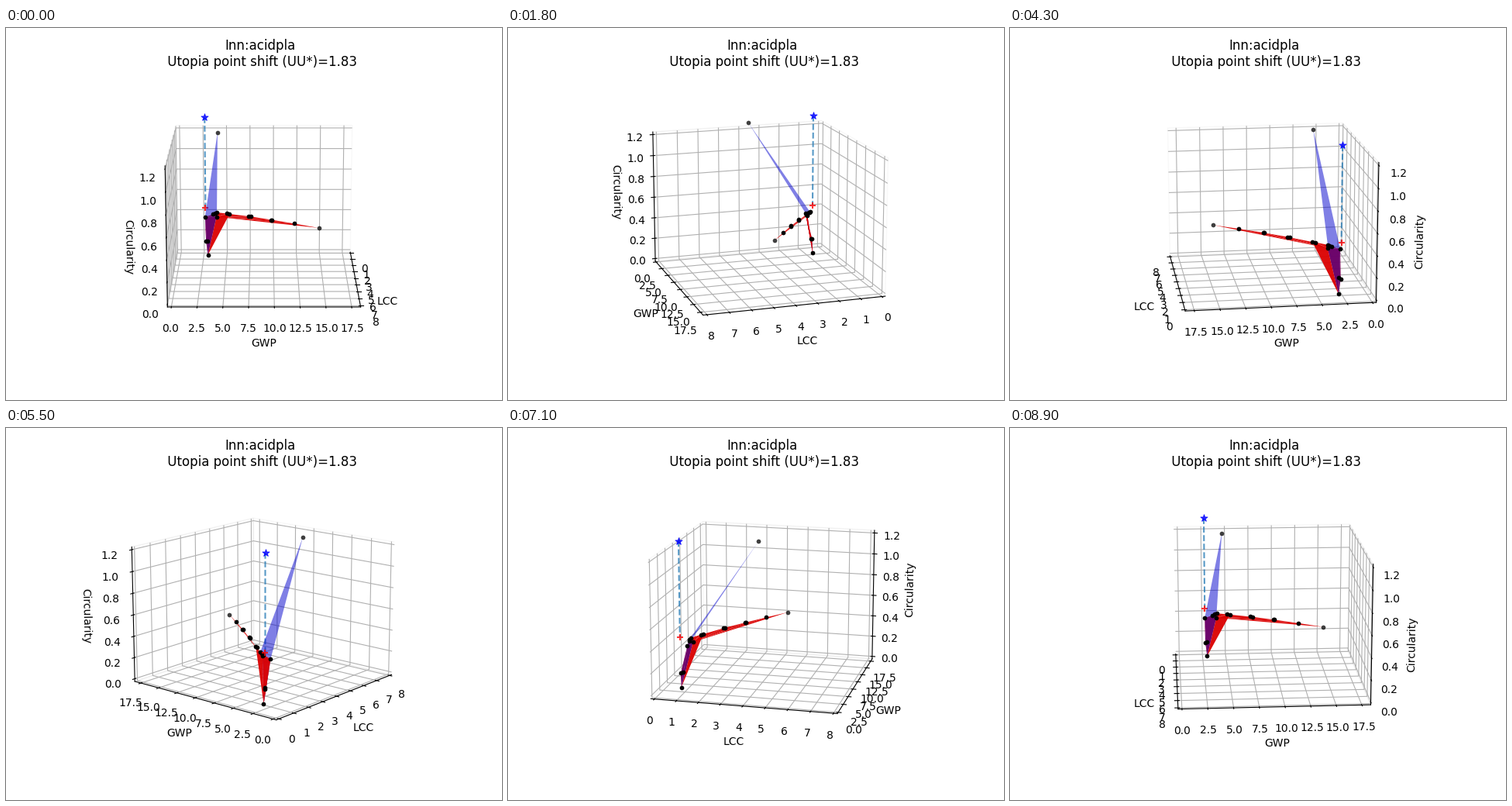
Write a matplotlib script that moves like this. It is 640 px wide and 480 px high and loops after 9 s.

```python
import numpy as np
import matplotlib.pyplot as plt
from matplotlib.animation import FuncAnimation
from mpl_toolkits.mplot3d.art3d import Poly3DCollection

FRAMES, INTERVAL, ELEV = 90, 100, 15

# (LCC, GWP, Circularity)
TOP = (4.175, 4.34, 1.342)
END = (4.42, 14.54, 0.474)
CHAIN = [(3.664, 12.13, 0.472),
         (2.93, 9.72, 0.468), (2.95, 9.84, 0.468),
         (2.185, 7.42, 0.461), (2.23, 7.62, 0.461),
         (1.434, 5.075, 0.447), (1.51, 5.36, 0.447)]
BEND = CHAIN[-1]
KNEE = (1.097, 3.99, 0.440)
RIDGE = (1.08, 3.82, 0.430)
SHELF = (1.095, 3.57, 0.421)
INNER = (1.214, 3.95, 0.403)
SIDE = (1.116, 2.73, 0.398)
LOW_A = (0.787, 2.79, 0.139)
LOW_B = (0.875, 2.96, 0.149)
BASE = (0.78, 2.97, 0.003)
UTOPIA = (0.773, 2.763, 1.342)
SHIFTED = (0.773, 2.763, 0.471)

fig = plt.figure(figsize=(6.4, 4.8), dpi=100)
ax = fig.add_subplot(projection="3d", computed_zorder=False)


def padded(hi):
    return -hi / 48, hi * 49 / 48


def surface(tris, color, alpha):
    poly = Poly3DCollection(tris, facecolors=[color], edgecolors="none",
                            linewidths=0, alpha=alpha)
    ax.add_collection3d(poly)
    return poly


def dots(points, zorder, **style):
    return ax.scatter(*np.transpose(points), depthshade=False,
                      zorder=zorder, **style)


ridge = [END, CHAIN[0], CHAIN[2], CHAIN[4], BEND, CHAIN[5], KNEE]
red = surface([(INNER, p, q) for p, q in zip(ridge, ridge[1:])]
              + [(BASE, BEND, INNER), (BASE, INNER, SIDE),
                 (BASE, SIDE, LOW_A), (SIDE, SHELF, INNER),
                 (SHELF, KNEE, INNER)],
              (0.86, 0, 0), 0.95)
blue = surface([(TOP, SIDE, KNEE), (SIDE, KNEE, INNER),
                (SIDE, INNER, BASE), (SIDE, LOW_A, BASE)],
               (0, 0, 0.8), 0.5)

ax.plot(*np.transpose([UTOPIA, SHIFTED]), "--", color="C0", alpha=0.75,
        zorder=2)
dots(CHAIN + [KNEE, RIDGE, SHELF, INNER, SIDE, LOW_A, LOW_B, BASE], 5,
     c="k", s=17, linewidths=0)
dots([TOP, END], 5, c="k", s=14, linewidths=0.3, alpha=0.75)
dots([UTOPIA], 6, c="b", marker="*", s=45, linewidths=0.8, alpha=0.8)
plus = dots([SHIFTED], 6, c="r", marker="+", s=30, linewidths=1.5, alpha=0.8)

ax.set_xticks(np.arange(0, 9, 1))
ax.set_yticks(np.arange(0, 18, 2.5))
ax.set_zticks(np.arange(0, 1.3, 0.2))
ax.set_xlim(*padded(8))
ax.set_ylim(*padded(18))
ax.set_zlim(*padded(1.2))
ax.set_xlabel("LCC")
ax.set_ylabel("GWP")
ax.set_zlabel("Circularity")
ax.set_title("Inn:acidpla\n Utopia point shift (UU*)=1.83")
for axis in (ax.xaxis, ax.yaxis, ax.zaxis):
    axis.pane.fill = False


def update(i):
    azim = i * 360 / FRAMES
    # The nearer surface is painted last.
    blue_near = azim < 12 or 160 <= azim < 196 or azim >= 260
    red.set_zorder(3 if blue_near else 4)
    blue.set_zorder(4 if blue_near else 3)
    plus.set_zorder(6 if 150 < azim < 256 else 2.5)
    # A tiny offset keeps the axis sides stable at right angles.
    ax.view_init(elev=ELEV, azim=azim + 1e-3)
    return []


anim = FuncAnimation(fig, update, frames=FRAMES, interval=INTERVAL,
                     init_func=lambda: update(0), repeat=True)
plt.show()
```
